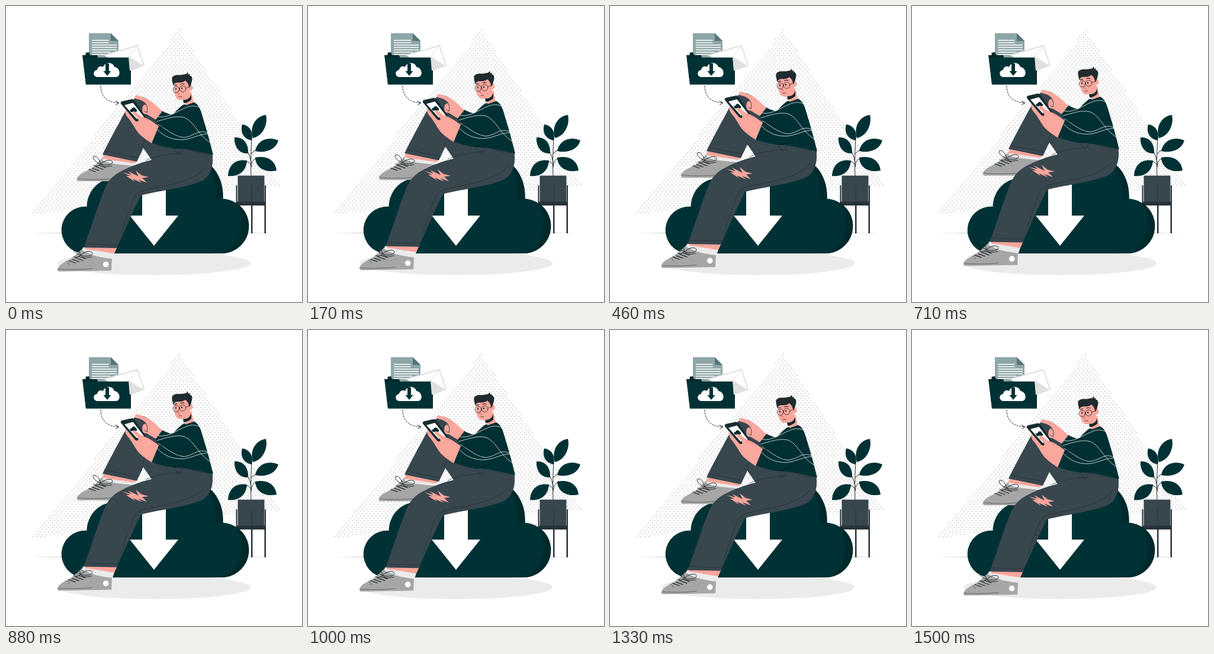
Animation, 500 px wide and 500 px high, one loop 1.54 s. Source, as an HTML page with a canvas:

```html
<!DOCTYPE html>
<html lang="en">
<head>
<meta charset="utf-8">
<title>Cloud download</title>
<style>
html, body { margin: 0; width: 100%; height: 100%; overflow: hidden; background: #fff; }
canvas { display: block; width: 500px; height: 500px; }
</style>
</head>
<body>
<canvas id="stage"></canvas>
<script>
const LOOP = 1540, FPS = 24, CYCLE = 36, RISE = 10;
const DARK = '#003235', SHADE = '#00292c', KNIT = '#003033', INK = '#202b2f', SLATE = '#38464e',
      SKIN = '#faa79d', SHOE = '#a6a6a6', SOCK = '#ebebeb', WHITE = '#fff';

const canvas = document.getElementById('stage');
const ctx = canvas.getContext('2d');
const ratio = window.devicePixelRatio || 1;
canvas.width = canvas.height = 500 * ratio;

const cache = new Map();
function shape(d) {
  if (!cache.has(d)) cache.set(d, new Path2D(d));
  return cache.get(d);
}
function fill(color, d) {
  ctx.fillStyle = color;
  ctx.fill(shape(d));
}
function line(color, width, d) {
  ctx.strokeStyle = color;
  ctx.lineWidth = width;
  ctx.stroke(shape(d));
}
function disc(color, x, y, rx, ry = rx) {
  ctx.fillStyle = color;
  ctx.beginPath();
  ctx.ellipse(x, y, rx, ry, 0, 0, Math.PI * 2);
  ctx.fill();
}
function ring(color, width, x, y, r) {
  ctx.strokeStyle = color;
  ctx.lineWidth = width;
  ctx.beginPath();
  ctx.arc(x, y, r, 0, Math.PI * 2);
  ctx.stroke();
}

// Staggered halftone inside the tilted triangle.
function makeDots() {
  const path = new Path2D(), dx = 6.6, dy = 3.9;
  const base = x => 352 - (x - 42) * 49 / 421;
  for (let row = 0, y = 41; y < 353; row++, y += dy) {
    const left = 293 - (y - 40) * 251 / 312;
    const right = 293 + (y - 40) * 170 / 263;
    const first = 293 + (row % 2) * dx / 2;
    for (let i = Math.ceil((left - first) / dx); first + i * dx <= right; i++) {
      const x = first + i * dx;
      if (y > base(x)) continue;
      path.moveTo(x + 1.25, y);
      path.arc(x, y, 1.25, 0, Math.PI * 2);
    }
  }
  return path;
}
const dots = makeDots();

function drawPlant() {
  line(INK, 1, 'M414 288 C413 265 414 240 415 222 M414 250 Q417 246 424 242 M414 270 Q413 264 405 262 M414 272 Q415 258 423 258 M414 264 Q413 255 408 246');
  fill(DARK, 'M417 223 C411 205 421 186 439 184 C443 199 434 220 417 223Z');
  fill(DARK, 'M399 200 C412 202 418 212 415 227 C402 225 395 214 399 200Z');
  fill(DARK, 'M386 222 C400 221 410 231 409 249 C394 250 385 238 386 222Z');
  fill(DARK, 'M421 245 C424 228 441 219 460 227 C456 243 437 249 421 245Z');
  fill(DARK, 'M375 287 C376 268 388 258 407 261 C406 279 393 289 375 287Z');
  fill(DARK, 'M421 256 C440 252 455 260 457 278 C440 282 422 275 421 256Z');
  line('#001b1e', .6, 'M417 222 Q424 204 437 187 M415 226 Q409 212 401 202 M409 248 Q400 234 388 224 M422 244 Q438 236 457 228 M377 285 Q390 270 406 262 M422 257 Q439 263 455 276');
  fill(SLATE, 'M391.500 286.500H436.500V331H391.500Z');
  fill('#263238', 'M388.500 303H390.500V331H388.500Z M437 303H439V331H437Z M388.500 330.500H439V337H388.500Z M414 337H416.500V384H414Z M436.500 337H439V384H436.500Z');
  line('#263238', 1, 'M415 303V331');
}

function drawFolder() {
  fill('#8fa6a8', 'M140 46H177L190 59V95H140Z');
  fill('#557578', 'M177 46L190 59H177Z');
  line(WHITE, 1.4, 'M145.500 58H173 M145.500 62H173 M145.500 66H186.500 M145.500 70H186.500 M145.500 74H186.500 M145.500 78H176 M145.500 82H186.500');
  fill(WHITE, 'M166 83L222 67L233 100L207 110Z');
  fill('#e0e0e0', 'M206 84L232 101L207 110Z');
  line('#e0e0e0', 2, 'M166 83L222 67L233 100L207 110');
  line('#e0e0e0', 1, 'M222 67L206 87');
  fill(SHADE, 'M129 83H134.500V79L140 78L142 83H154L155.500 88H207L208 109H211V132.500H135Z');
  fill(DARK, 'M130 87H207L211 132.500H135Z');
  fill(WHITE, 'M155 120 C146.500 120 146 109 154 108 C155 102 160 101 164 103 C167 94 181 94 183 103 C193 104 195 119 186 120Z');
  fill(DARK, 'M168 97H174V110H177.500L171 118L164.500 110H168Z');
  ctx.setLineDash([2.6, 2.2]);
  line(INK, 1, 'M160 135 C160 152 170 163 190 163.500');
  ctx.setLineDash([]);
  line(INK, 1, 'M185 160.500L191 163.700L185.500 167');
}

function drawCloud() {
  fill(DARK, 'M130 418 A39.500 39.500 0 1 1 136.500 339 C137 315 154 292 182 291L240 262H336 C356 274 368 298 366.500 325.500 A46.300 46.300 0 0 1 363 418Z');
  fill(SHADE, 'M336 262 C356 274 368 298 366.500 325.500L354 327 C356 301 350 280 336 268Z');
  fill(SHADE, 'M388 332 A46.300 46.300 0 0 1 363 418 C402 408 405 354 388 332Z');
  fill(WHITE, 'M230 285H270V354H291L250 405L209 354H230Z');
}

function laces(x, y) {
  ctx.save();
  ctx.translate(x, y);
  line(INK, 1, 'M160 267 C151 264 145 257 148 254 C153 252 158 259 160 267 C168 259 180 259 180 264 C179 269 167 270 160 267 M160 267C166 274 172 271 179 270 M160 267Q154 273 148 269');
  line(INK, 1.3, 'M157 269L168 273 M151 271L164 276 M146 274L157 278 M140 276L151 280');
  ctx.restore();
}

function drawBackLeg() {
  fill(SHOE, 'M121 289 C126 281 143 277 151 268 L163 256 C175 266 200 264 216 267 L200 296H123 C119 296 119 291 121 289Z');
  line('#555', .8, 'M121 291.500 C140 294 160 293 176 292');
  fill(SOCK, 'M164 256L219 262L214 270C196 268 175 267 163 261Z');
  fill(SKIN, 'M165 250L221 261L217 266L163 258Z');
  laces(0, 0);
  fill(SLATE, 'M163 251 C174 228 188 203 201 179 C206 168 214 156 224 153 C236 152 250 164 262 180 L300 215L330 250L300 264L246 260L232 240L221 263Z');
  line('#222d32', .7, 'M166 245L223 256 M229 239C234 225 239 218 245 213');
}

function drawFrontLeg() {
  fill(SHOE, 'M88 442 C93 433 109 430 117 421 L128 411 C142 421 160 423 179 426L178 447L91 448.500 C86 448.500 86.500 445 88 442Z');
  line('#555', .8, 'M88 444.500C112 446 132 445 146 443.500 M102 431Q106 433 107 437');
  disc(WHITE, 168.7, 436.5, 4.8);
  fill(SOCK, 'M131 407L185 411L180 427C160 425 142 421 128 412Z');
  fill(SKIN, 'M134 407H188L183 418C166 416 150 412 134 411Z');
  laces(-34, 154);
  fill(SLATE, 'M131 408 C144 375 153 342 165 313 C170 299 177 289 191 281 C209 271 229 264 246 260 L232 238L262 226L348 246 C351 264 349 282 334 294 C312 306 262 311 228 320 C215 345 199 383 187 409Z');
  line('#222d32', .7, 'M134 401.500Q162 404 190 403 M194 386C202 362 209 336 219 319C225 311 245 309 263 305C295 299 325 289 337 273 M236 261C254 252 276 250 299 249 M283 240C286 244 289 250 294 253 M299 241C297 247 293 250 288 248 M312 243Q326 251 347 250');
  fill(SKIN, 'M196.500 281L212 285L206 279L224 288L219 278L229 286L241 289L230 290.500L238 298.500L223 293L230 299L214 292L218 297L203 287L210 287Z');
}

function drawTorso() {
  fill(KNIT, 'M299 167L316 162 C326 165 329 176 333 190 C340 212 345 232 350 251.500 C330 247 305 241 290 241 C275 240 258 236 246 231L258 203L252 192L263 177 C272 181 280 186 284 181 C292 172 295 170 299 167Z');
  line(WHITE, .75, 'M257 187 C274 190 288 178 301 173 C311 168 319 168 326 171 M255 195 C272 190 286 185 300 188 C318 194 323 218 347 232 M256 209 C268 221 280 226 298 226 C318 224 324 216 344 216 M257 200 C269 206 281 219 299 222 C317 222 325 205 343 216');
  line('#00191b', .7, 'M261 203C274 207 284 211 292 220 M283 240Q299 239 309 232');
}

function drawHead() {
  fill(SKIN, 'M301 150L313 145L317 163L303 168Z');
  fill('#14262a', 'M299 158C306 160 311 155 313 149L313 158C309 162 304 164 300 164Z');
  fill(SKIN, 'M285 130 C282 142 285 153 289 157 C296 162 306 158 310 150L313 132L300 122Z');
  disc(SKIN, 312.3, 138, 3.3, 4.4);
  fill(INK, 'M282 134 C282 129 279 124 281 120 C286 114 295 118 300 115.500 C304 116 306 114 306.500 112 C308 113 308 115 307.500 116 L311 114.500L310 117 C315 119 315 122 314 127L312 134L309 138 C309 133 307 129 303 126 C297 131 290 128 286 130 C284 131 284 133 282 134Z');
  ring(INK, .8, 287.5, 141, 5.3);
  ring(INK, .8, 298.5, 140, 5.3);
  line(INK, .8, 'M304 138.500L311 136.500 M292.500 140L293.500 140');
  line(INK, 1.2, 'M283.500 134L288.500 133 M295 132Q298 130.500 301 132');
  disc(INK, 287, 140, 1.1, 1.6);
  disc(INK, 297, 139, 1.1, 1.6);
  line('#a3433f', .7, 'M292 142L290 148L293 149');
  line(INK, .8, 'M292 153.500Q295 152 297 153.500');
}

function drawHands() {
  // Far hand curls around the phone, palm of the near hand sits behind it.
  fill(SKIN, 'M218 154 C217 150 222 150 228 153 C237 156 245 160 250 165L264 178L253 192 C246 188 240 184 236 182L220 158Z');
  fill(SLATE, 'M216 156L225 158 C234 161 240 167 239 174 C238 179 236 182 233 184Z');
  fill(SKIN, 'M231 181 C229 174 231 166 235 166 C240 167 240 176 236 183Z');
  line(INK, .7, 'M231 168 C236 163 241 171 238 180 M233 177Q235 180 239 179');
  fill(SKIN, 'M204 174 C199 176 201 184 208 191 C215 200 219 210 226 217 C232 223 240 228 246 232L258 203L234 188Z');
  fill('#172c31', 'M194 165Q193 162 196 161L212 157.500Q215 157 217 159.500L236.500 188L222 195Q219 195.500 217 192.500Z');
  fill(WHITE, 'M200 167.500L214.500 163.500L233 187.500L220.500 190.500Z');
  fill(SHADE, 'M212 179 C208 178 209 174 212.500 174 C213 170 219 171 219 174 C222 175 222 179 219 179Z');
  fill(SKIN, 'M258 203 C247 195 240 190 233 188 C226 186 220 177 215 178 C212 180 217 185 221 188 C224 191 224 200 230 207L246 215Z');
  line('#c9605a', .6, 'M232 188Q238 189 241 193');
}

function draw(time) {
  const step = Math.min(CYCLE, Math.floor((time + 4.9) * FPS / 1000));
  const phase = step / CYCLE;
  const lift = RISE * (1 - Math.abs(1 - 2 * phase));

  ctx.setTransform(ratio, 0, 0, ratio, 0, 0);
  ctx.lineCap = ctx.lineJoin = 'round';
  ctx.fillStyle = WHITE;
  ctx.fillRect(0, 0, 500, 500);
  ctx.fillStyle = '#dcdcdc';
  ctx.fill(dots);
  fill(INK, 'M43 383.500L250 383L455 383.500L250 384Z');
  disc('#ebebeb', 250, 434.5, 163, 20);
  drawPlant();
  drawFolder();
  drawCloud();

  ctx.translate(0, -lift);
  drawBackLeg();
  drawFrontLeg();
  drawTorso();
  drawHead();
  drawHands();
}

const start = performance.now();
function tick() {
  draw((performance.now() - start) % LOOP);
  requestAnimationFrame(tick);
}
tick();
</script>
</body>
</html>
```
